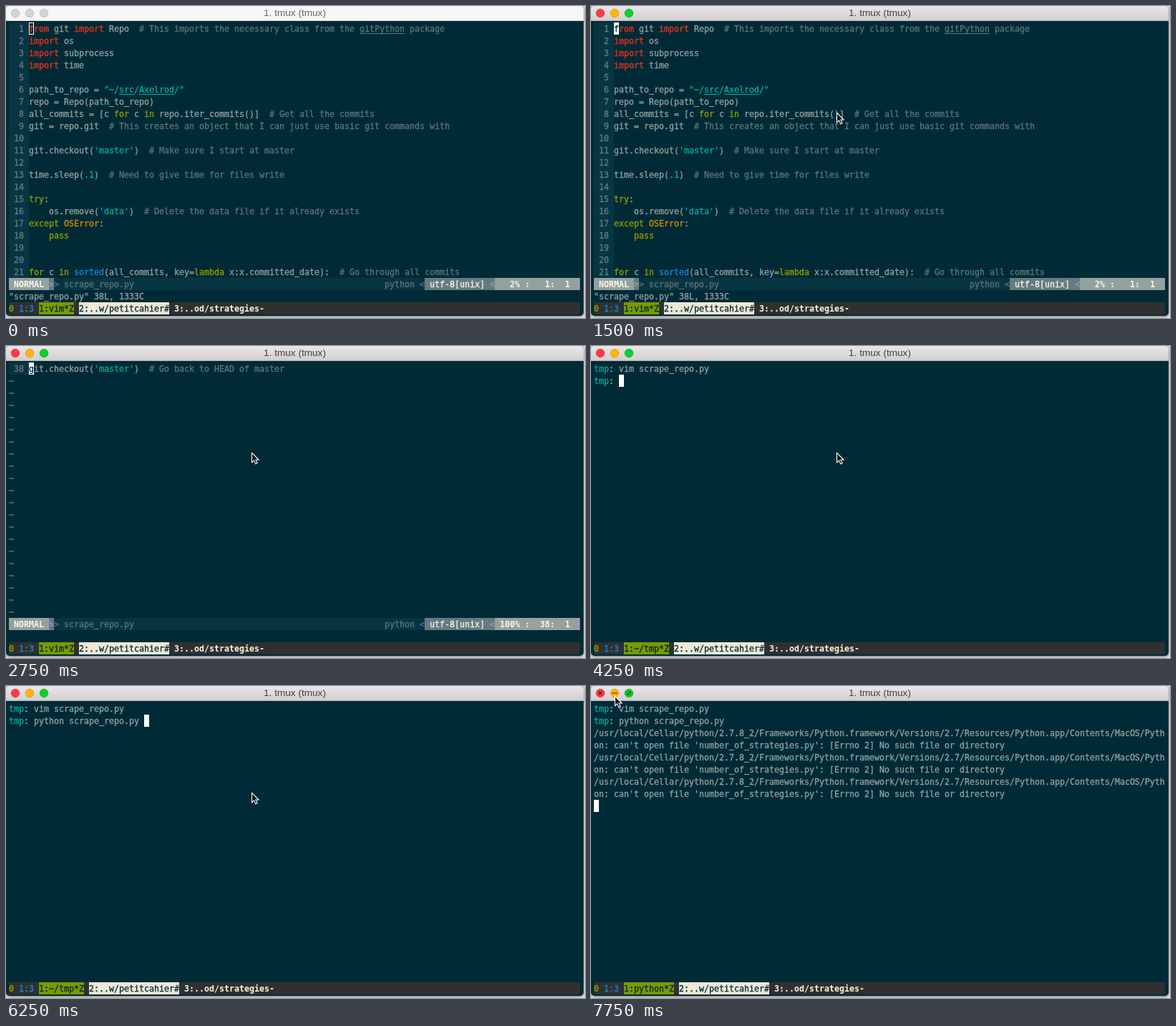
These frames come from a looping animation (809x436 px, 8 s). An HTML page:

```html
<!DOCTYPE html>
<html lang="en">
<head>
<meta charset="utf-8">
<title>Terminal session</title>
<style>
html, body { margin: 0; width: 809px; height: 436px; overflow: hidden; background: #e9ebec; }
#win { position: relative; width: 807px; height: 433px; background: #002b36; border-radius: 4px 4px 5px 5px;
  box-shadow: 0 1px 5px rgba(0,0,0,.6); }
#bar { height: 20px; border-bottom: 1px solid #b5b3b5; border-radius: 4px 4px 0 0; text-align: center;
  background: linear-gradient(#e9e7e9, #d0ced0); color: #414141;
  font: 13.6px/20px "Liberation Sans", sans-serif; }
.blur #bar { background: #f6f6f6; border-color: #d2d2d2; color: #666; }
svg { position: absolute; left: 0; top: 0; }
.blur .light { fill: #d4d4d4; stroke: #bcbcbc; }
#icons { visibility: hidden; }
.hover #icons { visibility: visible; }
#rows, #cursor { position: absolute; margin: 0; white-space: pre; color: #93a1a1;
  font: 11.64px/19px "DejaVu Sans Mono", monospace; -webkit-text-stroke: .3px; }
#rows { left: 4px; top: 23px; }
#rows div { height: 17px; }
#rows span { display: inline-block; height: 17px; vertical-align: top; }
u { text-underline-offset: 2px; }
#cursor { width: 7px; height: 17px; background: #fff; color: #002b36; }
.blur #cursor { background: none; color: transparent; box-shadow: inset 0 0 0 1px #fff; }
.comment, .file { color: #5c757c; }
.gutter { background: #073642; color: #657b83; }
.string, .number, .prompt { color: #00aca0; }
.include { color: #e8321a; }
.keyword { color: #8fa000; }
.builtin { color: #1089e0; }
.error { color: #cc8c00; }
.tilde { color: #657b83; }
.mode { background: #93a1a1; color: #fdf6e3; font-weight: bold; }
.mode, b { -webkit-text-stroke: 0; }
.step { background: #657b83; color: #93a1a1; }
.mid { background: #657b83; color: #fdf6e3; }
.file { background: #073642; }
.tmux { background: #303030; color: #fdf6e3; }
.session { color: #94a000; }
.active { background: #7a9a00; color: #002b36; }
.other { background: #eee8d5; color: #002b36; }
</style>
</head>
<body>
<div id="win">
  <div id="bar">1. tmux (tmux)</div>
  <svg width="80" height="21">
    <g stroke-width=".8">
      <circle class="light" cx="13" cy="10" r="5.8" fill="#fd3b45" stroke="#e0303c"/>
      <circle class="light" cx="33" cy="10" r="5.8" fill="#feb40a" stroke="#e09c08"/>
      <circle class="light" cx="53" cy="10" r="5.8" fill="#0ccf2e" stroke="#0ab526"/>
    </g>
    <g id="icons" stroke-width="1.4" fill="#0b5a14">
      <path d="M10.5 7.5l5 5m0-5l-5 5" stroke="#6b0510"/>
      <path d="M29 10h8" stroke="#7d4a00"/>
      <path d="M50.2 8.4v4.4h4.4zM51.6 7.2h4.4v4.4z"/>
    </g>
  </svg>
  <pre id="rows"></pre>
  <div id="cursor"></div>
  <svg id="mouse" width="14" height="19">
    <path d="M1 .8V14.2L4.1 11.4 6.2 16.3 8.6 15.3 6.5 10.5H10.6Z" fill="#111" stroke="#fff" stroke-width="1.1"/>
  </svg>
</div>
<script>
const $ = id => document.getElementById(id);
const win = $('win'), rowsEl = $('rows'), cursorEl = $('cursor'), mouseEl = $('mouse');
const CELL = 7, LINE = 17, LEFT = 4, TOP = 23, PAGE = 21;

const source = `from git import Repo  # This imports the necessary class from the gitPython package
import os
import subprocess
import time

path_to_repo = "~/src/Axelrod/"
repo = Repo(path_to_repo)
all_commits = [c for c in repo.iter_commits()]  # Get all the commits
git = repo.git  # This creates an object that I can just use basic git commands with

git.checkout('master')  # Make sure I start at master

time.sleep(.1)  # Need to give time for files write

try:
    os.remove('data')  # Delete the data file if it already exists
except OSError:
    pass


for c in sorted(all_commits, key=lambda x:x.committed_date):  # Go through all commits
    for rubbish in [".DS_Store",
                    "axelrod/.DS_Store",
                    "axelrod/tests/.DS_Store",
                    "axelrod/strategies/.DS_Store"]:  # Delete files that were not ignored
        try:
            os.remove(path_to_repo + rubbish)
        except OSError:
            pass

    git.checkout(c)  # Checkout the commit
    time.sleep(.1)  # Need to give time for files write
    try:
        subprocess.call(['python', 'number_of_strategies.py', str(c.committed_date)])
    except ImportError:
        pass

git.checkout('master')  # Go back to HEAD of master`.split('\n');

const failure = [
  '/usr/local/Cellar/python/2.7.8_2/Frameworks/Python.framework/Versions/2.7/Resources/Python.app/Contents/MacOS/Pyth',
  "on: can't open file 'number_of_strategies.py': [Errno 2] No such file or directory"
];

const span = (cls, text) => `<span class="${cls}">${text}</span>`;

const tokens = new RegExp([
  '(?<comment>#.*)', `(?<string>'[^']*'|"[^"]*")`, '\\b(?<include>from|import)\\b',
  '\\b(?<keyword>for|in|try|except|pass|lambda)\\b', '\\b(?<builtin>sorted|str)\\b',
  '\\b(?<error>OSError|ImportError)\\b', '(?<number>\\.\\d+)'
].join('|'), 'g');

function highlight(code) {
  return code.replace(tokens, (text, ...args) => {
    const groups = args.at(-1);
    const kind = Object.keys(groups).find(k => groups[k] !== undefined);
    return span(kind, text).replace(/\b(gitPython|src|Axelrod)\b/g, '<u>$1</u>');
  });
}

function tmuxBar(job) {
  return span('tmux', span('session', '0') + ' ' + span('builtin', '1:3') + ' ' + span('active', `1:${job}Z`) +
    ' ' + span('other', '2:..w/petitcahier#') + ' <b>3:..od/strategies-</b>' + ' '.repeat(67 - job.length));
}

function vim(first, message, typing) {
  const rows = [];
  for (let n = first; n < first + PAGE; n++) {
    rows.push(n > source.length ? span('tilde', '~')
      : span('gutter', String(n).padStart(3) + ' ') + highlight(source[n - 1]));
  }
  const percent = Math.floor(100 * first / source.length);
  rows.push(span('mode', ' NORMAL ') + span('step', '&gt;') +
    span('file', '&gt; scrape_repo.py' + ' '.repeat(50) + 'python &lt;') +
    span('mid', ' utf-8[unix] ') + span('step', '&lt;') +
    span('mode', ` ${String(percent).padStart(3)}% :${String(first).padStart(4)}:  1  `));
  rows.push(message, tmuxBar('vim*'));
  const cursor = typing ? [message.length, PAGE + 1, ''] : [4, 0, source[first - 1][0] || ''];
  return { rows, cursor };
}

function shell(command, errors = -1) {
  const prompt = span('prompt', 'tmp') + ': ';
  const rows = [prompt + 'vim scrape_repo.py', prompt + command];
  for (let i = 0; i < errors; i++) rows.push(...failure);
  const running = errors >= 0;
  const cursor = running ? [0, rows.length, ''] : [5 + command.length, 1, ''];
  while (rows.length < PAGE + 2) rows.push('');
  rows.push(tmuxBar(running ? 'python*' : '~/tmp*'));
  return { rows, cursor };
}

const run = 'python scrape_repo.py ';
const opened = '"scrape_repo.py" 38L, 1333C';
const screens = [
  [0, () => vim(1, opened)],
  [2250, () => vim(20, '')],
  [2750, () => vim(38, '')],
  [3750, () => vim(38, ':', true)],
  [4000, () => vim(38, ':q', true)],
  ...[[4250, 0], [5000, 1], [5250, 4], [5500, 7], [5750, 9], [6000, 10], [6250, 22]]
    .map(([at, typed]) => [at, () => shell(run.slice(0, typed))]),
  [6750, () => shell(run, 0)],
  [7500, () => shell(run, 1)],
  [7750, () => shell(run, 3)]
];
const pointer = [[0, null], [500, [343, 149]], [7000, [333, 81]], [7250, [73, 22]], [7500, [33, 14]]];
const latest = (steps, t) => steps.findLast(([at]) => at <= t)[1];

let shown;
function frame() {
  const t = performance.now() % 8000;
  const screen = latest(screens, t);
  if (screen !== shown) {
    shown = screen;
    const { rows, cursor: [col, row, char] } = screen();
    rowsEl.innerHTML = rows.map(r => `<div>${r}</div>`).join('');
    cursorEl.textContent = char;
    cursorEl.style.left = LEFT + col * CELL + 'px';
    cursorEl.style.top = TOP + row * LINE + 'px';
  }
  win.className = t < 1500 ? 'blur' : t >= 7500 ? 'hover' : '';
  const tip = latest(pointer, t);
  mouseEl.style.display = tip ? '' : 'none';
  if (tip) mouseEl.style.transform = `translate(${tip[0] - 0.5}px, ${tip[1] - 0.5}px)`;
  requestAnimationFrame(frame);
}
frame();
</script>
</body>
</html>
```
